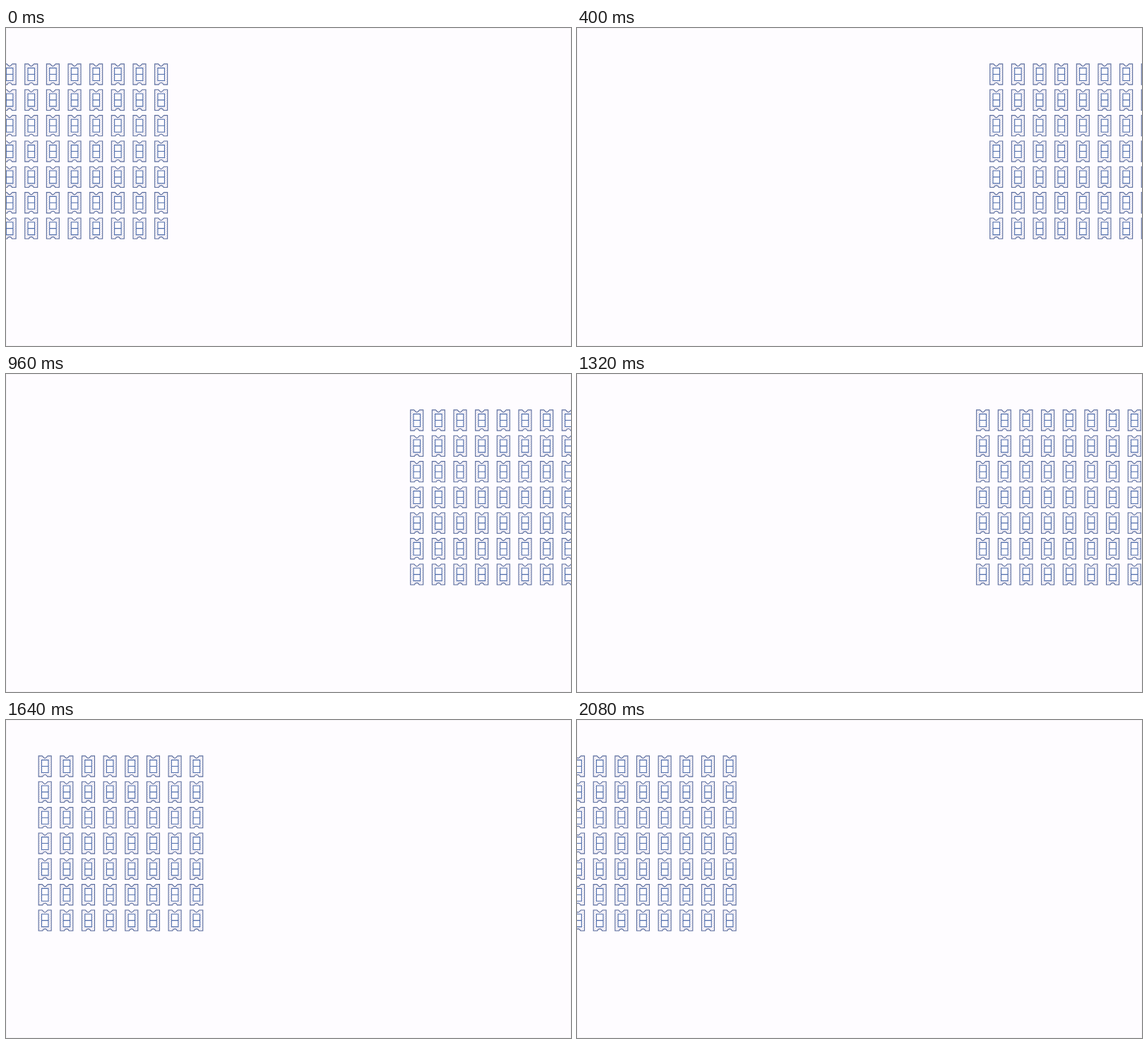
Animation of 800x450 px, one loop 2120 ms. Source, as an HTML page with a canvas:

```html
<!DOCTYPE html>
<html>
<head>
<meta charset="utf-8">
<style>
html, body { margin: 0; width: 100%; height: 100%; overflow: hidden; background: #fefcff; }
canvas { display: block; }
</style>
</head>
<body>
<canvas id="stage" width="800" height="450"></canvas>
<script>
const ctx = document.getElementById('stage').getContext('2d');
const LOOP = 2120, STEP = 40;
const LEFT = -7.3, RIGHT = 572.3;
const LEAD = 20, BACK = 1309;        // head start, start of the way back
const TRAVEL = 444, SETTLE = 575;
const COLS = 8, ROWS = 7, PITCH_X = 30.65, PITCH_Y = 36.35, TOP = 50.9;
const W = 18, H = 29.2;

const outline = new Path2D(
  `M0 0H5L7.6 2.6Q9 3.6 10.4 2.6L13 0H${W}V${H}H12.4Q11.4 26.6 9 26.6T5.6 ${H}H0Z`);
const panel = new Path2D('M4.3 5.7H13.8V23.6H4.3ZM4.3 14.6H13.8');
const hatch = new Path2D();
for (let y = -W; y < H; y += 3.2) {
  hatch.moveTo(0, y + W);
  hatch.lineTo(W, y);
}

// Swing past the end, then ease back to rest
function move(from, to, over, t) {
  const peak = to + Math.sign(to - from) * over;
  if (t < TRAVEL) return from + (peak - from) * (1 - Math.cos(Math.PI * t / TRAVEL)) / 2;
  const rest = Math.max(0, 1 - (t - TRAVEL) / SETTLE);
  return to + (peak - to) * rest ** 3;
}

function groupX(t) {
  const s = (t + LEAD) % LOOP;
  return s < BACK ? move(LEFT, RIGHT, 16.3, s) : move(RIGHT, LEFT, 8.3, s - BACK);
}

function stroke(path, color, width) {
  ctx.strokeStyle = color;
  ctx.lineWidth = width;
  ctx.stroke(path);
}

function card(x, y) {
  ctx.save();
  ctx.translate(x, y);
  ctx.save();
  ctx.clip(outline);
  stroke(hatch, '#d6d3e2', 0.9);
  ctx.restore();
  ctx.fillStyle = '#fefcff';
  ctx.fill(panel);
  stroke(outline, '#596b9d', 1.1);
  stroke(panel, '#4f6dab', 1.1);
  ctx.restore();
}

function draw(now) {
  const t = Math.floor(now % LOOP / STEP) * STEP;
  const x = groupX(t) + 0.4;
  ctx.fillStyle = '#fefcff';
  ctx.fillRect(0, 0, 800, 450);
  ctx.strokeStyle = '#f5f4f6';
  ctx.lineWidth = 1;
  ctx.strokeRect(0.5, 0.5, 799, 449);
  for (let r = 0; r < ROWS; r++)
    for (let c = 0; c < COLS; c++) card(x + c * PITCH_X, TOP + r * PITCH_Y);
}

const start = performance.now();
function tick() {
  draw(performance.now() - start);
  requestAnimationFrame(tick);
}
tick();
</script>
</body>
</html>
```
